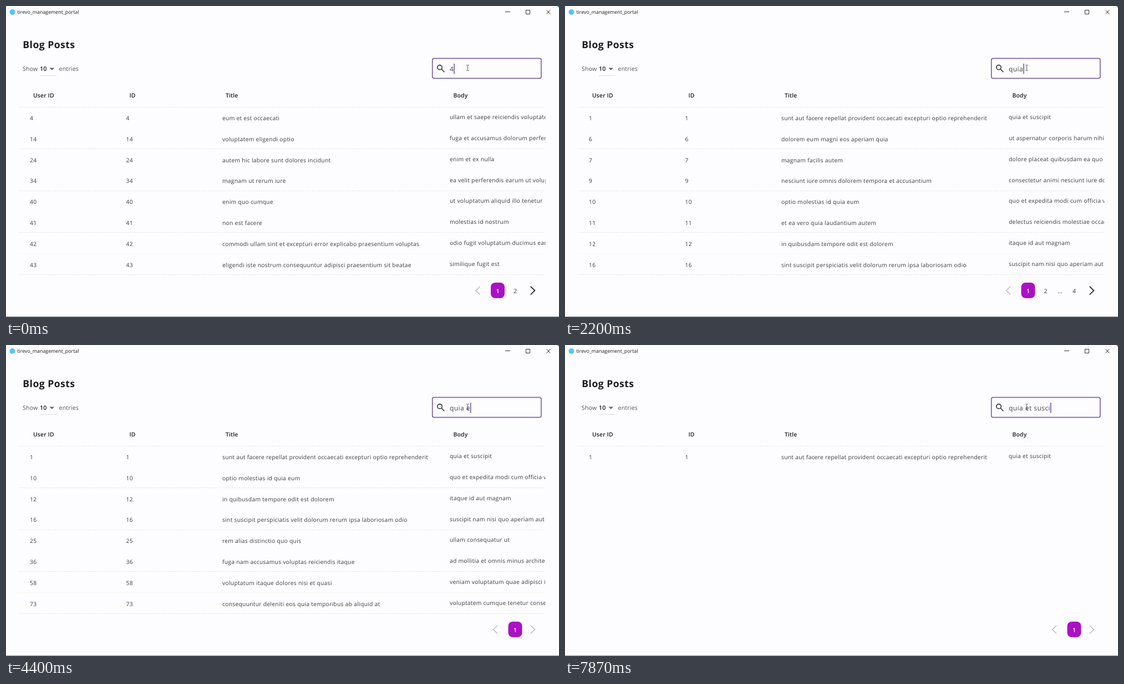
Write an HTML page that moves like this. It is 997x561 px and loops after 8 s.

```html
<!DOCTYPE html>
<html lang="en">
<head>
<meta charset="utf-8">
<title>Blog Posts</title>
<style>
  html, body { margin: 0; width: 100%; height: 100%; overflow: hidden; background: #fdfcfe; }
  svg { display: block; width: 100vw; height: 100vh; }
  text {
    font: 10.3px "Open Sans", "Noto Sans", sans-serif;
    letter-spacing: .27px;
    white-space: pre;
    text-rendering: geometricPrecision;
    fill: #3c3a42;
  }
  .head text { font-size: 10.4px; font-weight: 600; letter-spacing: .15px; fill: #1c1b20; }
  .small { font-size: 8.85px; letter-spacing: 0; fill: #1c1c1c; }
  .title { font-size: 17.6px; font-weight: 700; letter-spacing: .45px; fill: #1c1b20; }
  .label { font-size: 10.6px; letter-spacing: .2px; fill: #55525a; }
  .count { font-size: 10.8px; font-weight: 600; letter-spacing: 0; fill: #1c1b20; }
  .query { font-size: 12px; letter-spacing: .45px; fill: #45424a; }
  .hint { letter-spacing: .05px; }
  .page { font-size: 10.6px; letter-spacing: 0; text-anchor: middle; fill: #333; }
  .active { font-weight: 600; fill: #fff; }
  .line { fill: none; stroke: #333; }
  .rule { stroke: #e4e1eb; stroke-width: 1; stroke-dasharray: 2 2; }
</style>
</head>
<body>
<svg id="stage" viewBox="0 0 997 561" preserveAspectRatio="none">
  <clipPath id="tableClip"><rect x="0" y="140" width="972.5" height="350"/></clipPath>
  <rect width="997" height="561" fill="#fdfcfe"/>
  <path d="M0 560.5H997" stroke="#8f9094"/>
  <path d="M994 0h3v3z" fill="#3d7f8c"/>

  <circle cx="11.5" cy="11" r="5" fill="#54c5f8"/>
  <text class="small" x="20.5" y="14.3">tirevo_management_portal</text>
  <path class="line" d="M900 10.5h9M937.5 7.5h7v7h-7zM974.5 7.5l7 7m0-7l-7 7"/>

  <text class="title" x="30.3" y="75.5">Blog Posts</text>
  <text class="label" x="30" y="117.3">Show</text>
  <text class="count" x="61" y="117.3">10</text>
  <path d="M78.5 111.5h8.5l-4.25 4.3z" fill="#66636b"/>
  <path d="M61 125.5h30" stroke="#dedce2"/>
  <text class="label" x="95.5" y="117.3">entries</text>

  <rect x="768.7" y="94.4" width="196.2" height="36.2" rx="3" fill="none" stroke="#6750a4" stroke-width="1.5"/>
  <g class="line" stroke-width="1.6">
    <circle cx="782" cy="110.8" r="4.2"/>
    <path d="M785.2 114l5.2 5.2"/>
  </g>
  <text class="query hint" id="hint" x="800" y="118.4">Search</text>
  <text class="query" id="query" x="800" y="118.4"></text>
  <rect id="caret" y="104" width="1.5" height="18.5" fill="#6750a4"/>
  <path class="line" style="stroke:#555" stroke-width=".8" d="M830 106.5h1.8q.7 0 .7 .8v8.4q0 .8-.7 .8h-1.8M835 106.5h-1.8q-.7 0-.7 .8v8.4q0 .8 .7 .8h1.8"/>

  <g class="head">
    <text x="49" y="165">User ID</text>
    <text x="222.5" y="165">ID</text>
    <text x="396" y="165">Title</text>
    <text x="806.5" y="165">Body</text>
  </g>
  <path class="rule" d="M24 182.5H972"/>
  <g id="table" clip-path="url(#tableClip)"></g>
  <g id="pager"></g>
</svg>
<script>
const POSTS = {
  1: "sunt aut facere repellat provident occaecati excepturi optio reprehenderit|quia et suscipit",
  2: "qui est esse|est rerum tempore vitae",
  3: "ea molestias quasi exercitationem repellat qui ipsa sit aut|et iusto sed quo iure",
  4: "eum et est occaecati|ullam et saepe reiciendis voluptatem",
  5: "nesciunt quas odio|repudiandae veniam quaerat sunt",
  6: "dolorem eum magni eos aperiam quia|ut aspernatur corporis harum nihil",
  7: "magnam facilis autem|dolore placeat quibusdam ea quo",
  8: "dolorem dolore est ipsam|dignissimos aperiam dolorem qui",
  9: "nesciunt iure omnis dolorem tempora et accusantium|consectetur animi nesciunt iure dolore",
  10: "optio molestias id quia eum|quo et expedita modi cum officia vel",
  11: "et ea vero quia laudantium autem|delectus reiciendis molestiae occaecati",
  12: "in quibusdam tempore odit est dolorem|itaque id aut magnam",
  14: "voluptatem eligendi optio|fuga et accusamus dolorum perferendis",
  16: "sint suscipit perspiciatis velit dolorum rerum ipsa laboriosam odio|suscipit nam nisi quo aperiam aut",
  24: "autem hic labore sunt dolores incidunt|enim et ex nulla",
  25: "rem alias distinctio quo quis|ullam consequatur ut",
  34: "magnam ut rerum iure|ea velit perferendis earum ut voluptatem",
  36: "fuga nam accusamus voluptas reiciendis itaque|ad mollitia et omnis minus architecto",
  40: "enim quo cumque|ut voluptatum aliquid illo tenetur",
  41: "non est facere|molestias id nostrum",
  42: "commodi ullam sint et excepturi error explicabo praesentium voluptas|odio fugit voluptatum ducimus earum",
  43: "eligendi iste nostrum consequuntur adipisci praesentium sit beatae|similique fugit est",
  58: "voluptatum itaque dolores nisi et quasi|veniam voluptatum quae adipisci id",
  73: "consequuntur deleniti eos quia temporibus ab aliquid at|voluptatem cumque tenetur consequatur",
  86: "placeat quia et porro iste|quasi excepturi consequatur iste a"
};
const FIRST = "1 2 3 4 5 6 7 8";
const QUIA_ET = "1 12 25 86";

// start time, typed text, visible post ids, page count
const STEPS = [
  [0, "4", "4 14 24 34 40 41 42 43", 2],
  [30, "", FIRST, 10],
  [1630, "q", FIRST, 10],
  [1930, "qu", FIRST, 9],
  [2030, "qui", FIRST, 8],
  [2200, "quia", "1 6 7 9 10 11 12 16", 4],
  [3900, "quia ", "1 9 10 11 12 16 24 25", 3],
  [4400, "quia e", "1 10 12 16 25 36 58 73", 1],
  [4870, "quia et", QUIA_ET, 1],
  [6030, "quia et ", QUIA_ET, 1],
  [6330, "quia et s", "1", 1],
  [7000, "quia et su", "1", 1],
  [7200, "quia et sus", "1", 1],
  [7700, "quia et susc", "1", 1],
  [7870, "quia et susci", "1", 1]
];
const CARET_OFF = [[530, 1030], [1570, 1630], [2600, 3100], [3630, 3900], [5470, 5970], [6930, 7000]];
const LOOP = 8000, ROW = 37.8;
const byId = id => document.getElementById(id);
const [hint, query, caret, table, pager] = ["hint", "query", "caret", "table", "pager"].map(byId);

const label = (x, y, s, cls = "") => `<text x="${x}" y="${y}" class="${cls}">${s}</text>`;

function drawTable(ids) {
  table.innerHTML = ids.map((id, i) => {
    const y = 206 + i * ROW;
    const [title, body] = POSTS[id].split("|");
    const ruled = i % 2 && (i < ids.length - 1 || i === 7);
    const ruleY = Math.floor(182 + (i + 1) * ROW) + .5;
    return label(43, y, id) + label(216.5, y, id) + label(390, y, title) + label(800, y - 1.8, body) +
      (ruled ? `<path class="rule" d="M24 ${ruleY}H972"/>` : "") +
      (i === 6 ? '<path d="M24 446.5H972" stroke="#fbfaea"/>' : "");
  }).join("");
}

function chevron(x, dir, enabled) {
  return `<path class="line" d="M${x - dir * 3.8} 506l${dir * 7.6} 7.3l${-dir * 7.6} 7.3"
    style="stroke:${enabled ? "#333" : "#b9b7bd"};stroke-width:${enabled ? 1.9 : 1.4}"/>`;
}

// Laid out from the right edge, so the row grows leftwards.
function drawPager(count) {
  const labels = count > 3 ? [1, 2, "...", count] : Array.from({ length: count }, (_, i) => i + 1);
  let right = 933.75, out = chevron(949.6, 1, count > 1);
  for (const item of labels.reverse()) {
    const width = item === "..." ? 20 : item > 9 ? 37.5 : 31.5;
    const x = right - width / 2;
    if (item === 1) out += `<rect x="${x - 12.5}" y="499" width="25" height="28" rx="8" fill="#a911c5"/>`;
    out += label(x, 517.8, item, item === 1 ? "page active" : "page");
    right -= width;
  }
  pager.innerHTML = out + chevron(right - 20, -1, false);
}

let shown;
function show(step) {
  const [, text, ids, pages] = step;
  if (!shown || shown[2] !== ids) drawTable(ids.split(" "));
  if (!shown || shown[3] !== pages) drawPager(pages);
  query.textContent = text;
  caret.setAttribute("x", 800 + (text ? query.getComputedTextLength() : 0));
  shown = step;
}

const clamp = v => Math.max(0, Math.min(1, v));
function frame(now) {
  const t = now % LOOP;
  const step = STEPS.findLast(s => s[0] <= t);
  if (step !== shown) show(step);
  hint.style.opacity = Math.min(clamp((t - 30) / 200), clamp((1770 - t) / 140));
  caret.style.opacity = CARET_OFF.some(([from, to]) => t >= from && t < to) ? 0 : 1;
  requestAnimationFrame(frame);
}
frame(0);
</script>
</body>
</html>
```
